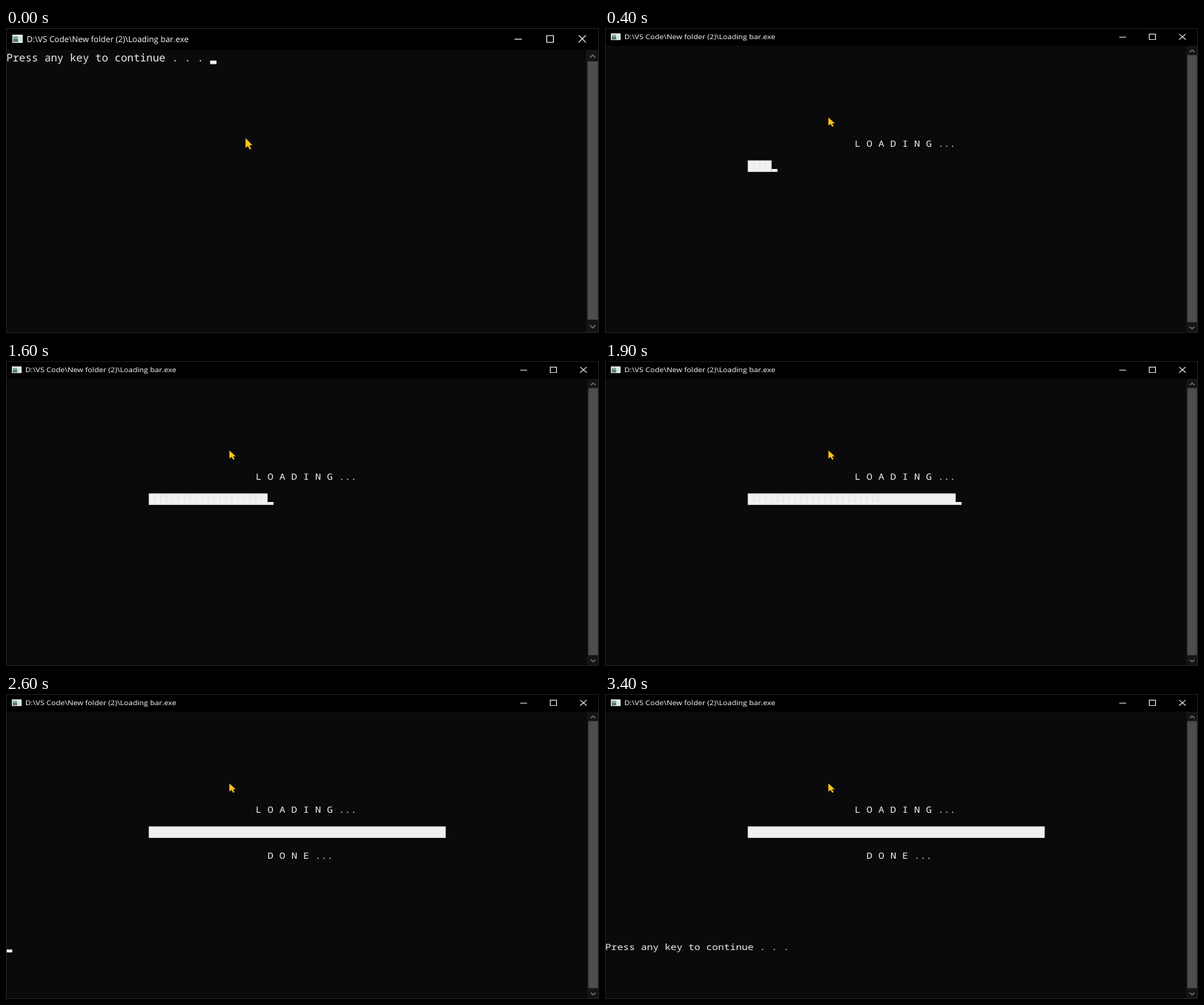
Write an HTML page that moves like this. It is 800x411 px and loops after 3.5 s.

```html
<!DOCTYPE html>
<html lang="en">
<head>
<meta charset="utf-8">
<title>Loading bar</title>
<style>
  html, body { margin: 0; width: 100%; height: 100%; overflow: hidden; background: #0a0a0c; }
  svg { display: block; width: 100%; height: 100%; }
  text { text-rendering: geometricPrecision; white-space: pre; }
  .title { font: 11px "Open Sans", "Noto Sans", sans-serif; fill: #fff; }
  .mono { font: 500 14.32px "Noto Sans Mono", "DejaVu Sans Mono", monospace; fill: #f0f0f0; }
  .line { fill: none; stroke: #fff; stroke-width: 1.1; }
  .arrow { fill: none; stroke: #6e6e6e; stroke-width: 1.7; }
</style>
</head>
<body>
<svg id="stage" viewBox="0 0 800 411"></svg>
<script>
const NS = 'http://www.w3.org/2000/svg';
const LOOP = 3500, COL = 8.592, ROW = 19, LEFT = .4, TOP = 29.7;
const SMALL = { w: 800, h: 411 }, LARGE = { w: 858, h: 506 };
const BAR_COL = 24, BAR_ROW = 10, TOTAL = 50;

// [start ms, filled cells, cursor visible]
const steps = [
  [100, 0, 1], [300, 1, 1], [400, 4, 1], [500, 5, 1], [600, 6, 1],
  [900, 10, 1], [1100, 10, 0], [1500, 15, 0], [1600, 20, 1], [1700, 25, 1],
  [1800, 30, 1], [1900, 35, 1], [2300, 35, 0], [2600, TOTAL, 1], [3200, TOTAL, 0]
];

function add(parent, tag, attrs, content) {
  const el = document.createElementNS(NS, tag);
  set(el, attrs);
  if (content) el.textContent = content;
  return parent.appendChild(el);
}
function set(el, attrs) {
  for (const key in attrs) el.setAttribute(key, attrs[key]);
}
const show = (el, on) => set(el, { visibility: on ? 'visible' : 'hidden' });
const rect = (parent, x, y, width, height, fill) =>
  add(parent, 'rect', { x, y, width, height, fill });
const path = (parent, d, cls) => add(parent, 'path', { d, class: cls });
const colX = col => LEFT + col * COL;
const rowY = row => TOP + row * ROW;
const print = (col, row, content) => add(win, 'text',
  { x: colX(col), y: rowY(row) + 15.4, class: 'mono' }, content);

const win = add(document.getElementById('stage'), 'g', {});
const body = rect(win, 0, 0, 800, 411, '#0a0a0c');
const titleBar = rect(win, 0, 0, 800, 29.3, '#000');

rect(win, 8.5, 9, 14, 11, '#eef2f0');
rect(win, 9.7, 11.2, 6.6, 7.6, '#7fa89a');
rect(win, 9.7, 15, 6.6, 3.8, '#4d776c');
rect(win, 18, 12, 3, 6, '#d2d9d6');
add(win, 'text', { x: 28, y: 19, class: 'title' }, 'D:\\VS Code\\New folder (2)\\Loading bar.exe');

const buttons = add(win, 'g', {});
path(buttons, 'M-114 15.1h10', 'line');
path(buttons, 'M-70.5 10.2h9v9h-9z', 'line');
path(buttons, 'M-27.3 9.8l9.5 9.5m0 -9.5l-9.5 9.5', 'line');

const track = rect(win, 783, 29.3, 17, 381, '#151517');
const thumb = rect(win, 785, 45, 14, 348, '#4d4d4d');
const upArrow = path(win, 'M-12 40l3.5 -3.5l3.5 3.5', 'arrow');
const downArrow = path(win, 'M-12 -10.5l3.5 3.5l3.5 -3.5', 'arrow');

const loading = print(42, 8, 'L O A D I N G ...');
const bar = rect(win, colX(BAR_COL), rowY(BAR_ROW), 0, ROW, '#f1f1f1');
const seams = add(win, 'path', { stroke: '#dde4dc', 'stroke-width': 1 });
const done = print(44, 12, 'D O N E ...');
const prompt = print(0, 0, 'Press any key to continue . . . ');
const cursor = rect(win, 0, 0, COL, 4.8, '#f2f2f2');
const border = add(win, 'rect',
  { x: .5, y: .5, fill: 'none', stroke: '#242426', 'stroke-width': 1 });
add(win, 'path', {
  d: 'M323.2 148.2v13.6l3.1 -2.8l2.4 4.7l2.1 -1l-2.3 -4.6h4z',
  fill: '#fbc51d'
});

function layout({ w, h }) {
  set(body, { width: w, height: h });
  set(titleBar, { width: w });
  set(buttons, { transform: `translate(${w})` });
  set(track, { x: w - 17, height: h - 29.3 });
  set(thumb, { x: w - 15.5, height: h - 63 });
  set(upArrow, { transform: `translate(${w})` });
  set(downArrow, { transform: `translate(${w} ${h})` });
  set(border, { width: w - 1, height: h - 1 });
}

function placeCursor(col, row) {
  set(cursor, { x: colX(col), y: rowY(row + 1) - 4.8 });
}

function render(t) {
  const started = t >= 100, finished = t >= 2600, waiting = t >= 2700;
  const [, cells, blink] = steps.findLast(s => t >= s[0]) || [0, 0, 1];
  const size = started ? LARGE : SMALL;

  layout(size);
  // The view refits the enlarged window a moment after it grows.
  const fit = t >= 400 ? `scale(${800 / size.w} ${411 / size.h})` : '';
  set(win, { transform: fit });

  show(loading, started);
  show(done, finished);
  show(prompt, !started || waiting);
  set(prompt, { transform: `translate(0 ${waiting ? 20 * ROW : 0})` });

  set(bar, { width: cells * COL });
  let d = '';
  for (let i = 1; i < Math.min(cells, 23); i++)
    d += `M${colX(BAR_COL + i)} ${rowY(BAR_ROW) + 2}v15`;
  set(seams, { d });
  show(seams, t >= 400 && !finished);

  show(cursor, blink);
  if (!started) placeCursor(32, 0);
  else if (waiting) placeCursor(32, 20);
  else if (finished) placeCursor(0, 20);
  else placeCursor(BAR_COL + cells, BAR_ROW);
}

const origin = performance.now();
function tick() {
  render((performance.now() - origin) % LOOP);
  requestAnimationFrame(tick);
}
render(0);
requestAnimationFrame(tick);
</script>
</body>
</html>
```
